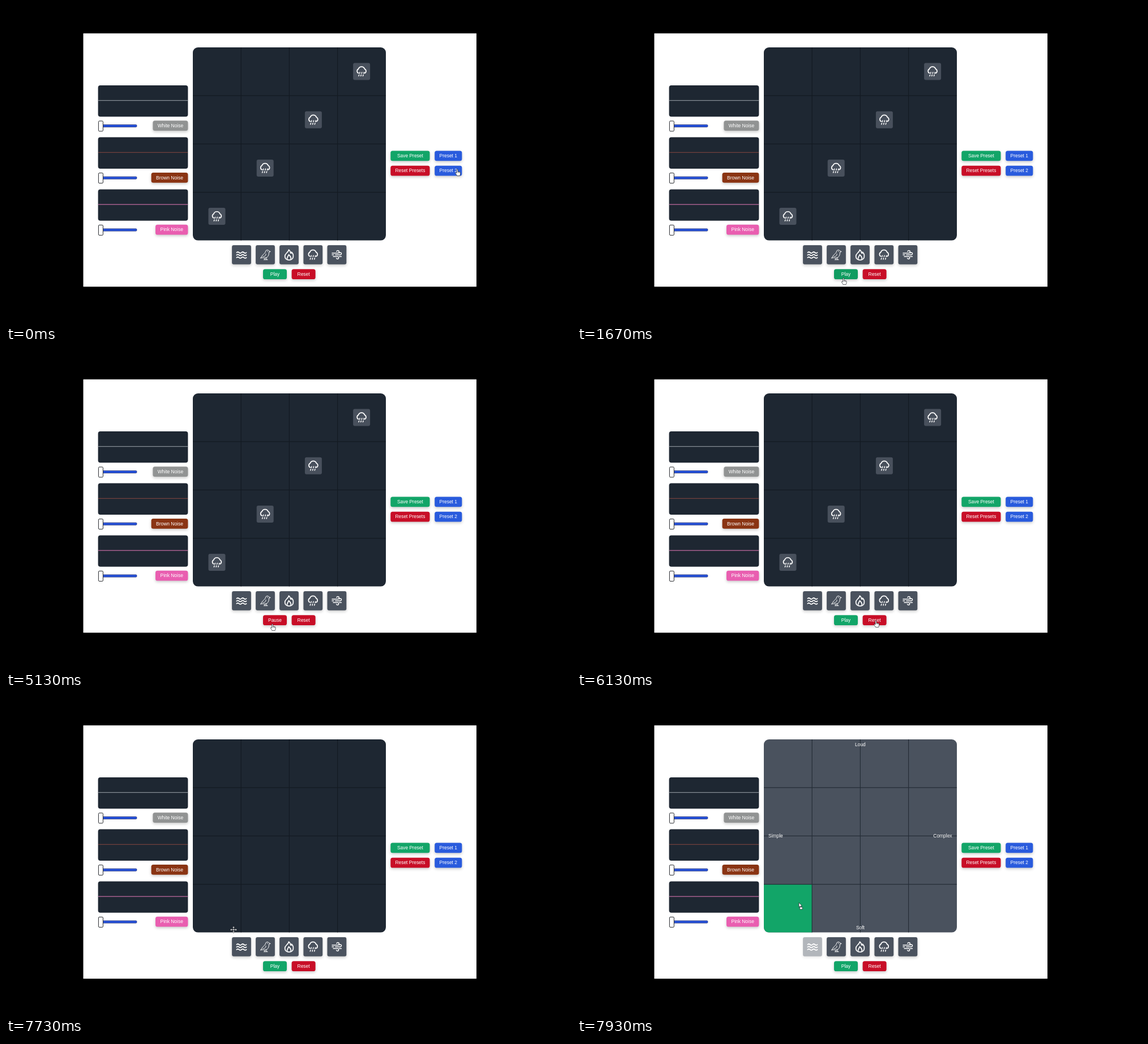
These frames come from a looping animation (998x561 px, 8 s). An HTML page:

```html
<!DOCTYPE html>
<html lang="en">
<head>
<meta charset="utf-8">
<title>Noise mixer</title>
<style>
html, body { margin: 0; width: 100%; height: 100%; overflow: hidden; background: #000; }
svg { display: block; width: 100%; height: 100%; }
text { font: 8.45px "Liberation Sans", Arial, sans-serif; fill: #fff; }
.mid { text-anchor: middle; }
.raised { filter: drop-shadow(0 2px 2.5px rgba(0, 0, 0, .22)); }
.icon { fill: none; stroke: #fff; stroke-width: 1.7; stroke-linecap: round; stroke-linejoin: round; }
.cursor { fill: #fff; stroke: #20242a; stroke-width: .7; stroke-linejoin: round; }
</style>
</head>
<body>
<svg id="stage" viewBox="0 0 998 561"></svg>
<script>
const LOOP = 8000;
const GREEN = [18, 165, 104], GREEN_HOVER = [16, 156, 97], RED = [200, 14, 39];
const PANEL = '#1e2732', SLATE = '#4a525e';
const GRID = { x: 330, y: 73, size: 341, cell: 85.2 };
const TILE_X = [416, 458, 500, 542.3, 584.4];
const rgb = c => `rgb(${c.map(Math.round)})`;

const ICONS = {
  waves: [-4.4, 0, 4.4].map(y =>
    `<path d="M-8.6 ${y + .6}q2.1 -2 4.3 0t4.3 0t4.3 0t4.3 0"/>`).join(''),
  bird: `<g stroke-width="1"><path d="M8.8 -5.6L6.6 -6.6A3.3 3.3 0 0 0 .4 -5.6C.2 -3 -2.6 -1.8 -4.6 .6L-8.4 6.2L-5.2 5C-2 6.6 2.6 5.8 4.8 2.6C6.4 .2 6.2 -2 6.5 -4.2Z"/>
    <path d="M1 -1.4C1.4 1.6 -1 3.4 -4 3.4M-.4 5.6L-.8 8.8M2 5.2L2.2 8.8M-2.6 8.8H.2M.8 8.8H4"/></g><circle cx="3.8" cy="-5.8" r=".4" stroke-width=".5"/>`,
  flame: `<path d="M-.6 -8.8C3 -6.6 2 -3.6 3.4 -2.4C4.4 -2.8 4.4 -4 4.2 -4.8C6.6 -2.6 7.8 .2 7.4 3A7.4 6.4 0 0 1 -7.4 3C-7.6 -.4 -5.6 -1.8 -3.6 -3.8C-1.8 -5.4 -.6 -6.6 -.6 -8.8Z"/>
    <path d="M-3.2 8C-4.6 4.6 -1.4 3 -.6 -.2C1.2 1.6 4.6 4.4 3 8"/>`,
  rain: `<path d="M-5.6 2.9A4 4 0 0 1 -5.6 -4.4A5.8 5.8 0 0 1 5.4 -4.4A4 4 0 0 1 5.6 2.9"/>` +
    [-3, .7, 4.4].map(x =>
      `<path stroke-width="1.5" d="M${x} 1.4l-.7 2.1M${x - 1.4} 6l-.7 2.1"/>`).join(''),
  wind: `<g stroke-width="1.5"><path d="M-8.4 -2.9H1.6A2.2 2.2 0 1 0 -.4 -5.8"/>
    <path d="M-8.4 .2H-5.6M-2.6 .2H6A2.1 2.1 0 1 0 4.2 -3"/>
    <path d="M-6.4 3.3H1.2A2.1 2.1 0 1 1 -.8 6.2M4.2 3.3H8"/></g>`
};

const CURSORS = {
  arrow: '<path d="M0 0V9L2.1 7.1L3.5 10.2L5 9.5L3.7 6.6H6.4Z"/>',
  hand: `<path d="M-1 .9A1 1 0 0 1 1 .9V4.1L4.6 4.8Q5.6 5.1 5.6 6.2V8Q5.2 10 4.5 11.6H-.4Q-1.2 9.6 -3 7.6Q-3.6 6.6 -2.7 6.1Q-1.9 5.9 -1 7Z"/>
    <path fill="none" stroke-width=".5" d="M1 4V6.4M2.6 4.6V6.5M4.1 4.9V6.7"/>`,
  move: `<path d="M0 -6L2.2 -3.4H.7V-.7H3.4V-2.2L6 0L3.4 2.2V.7H.7V3.4H2.2L0 6L-2.2 3.4H-.7V.7H-3.4V2.2L-6 0L-3.4 -2.2V-.7H-.7V-3.4H-2.2Z"/>`,
  drag: `<path d="M0 0V8L1.9 6.3L3 8.6L4.2 8L3.2 5.9H5.6Z"/>
    <rect x="1.4" y="8" width="4.8" height="3.8"/>`
};

const rect = (x, y, w, h, r, fill, extra = '') =>
  `<rect x="${x}" y="${y}" width="${w}" height="${h}" rx="${r}" fill="${fill}" ${extra}/>`;

const button = (x, y, w, label, fill, id = '') =>
  `<g ${id && `id="${id}"`}>${rect(x, y, w, 17.8, 3.6, fill, 'class="raised"')}
   <text class="mid" x="${x + w / 2}" y="${y + 11.6}">${label}</text></g>`;

const tile = (x, y, size, fill, icon, extra = '') =>
  `<g transform="translate(${x} ${y})" ${extra}>${rect(-size / 2, -size / 2, size, size, 3, fill)}
   <g class="icon">${ICONS[icon]}</g></g>`;

const noise = (y, label, x, fill, line) => `
  ${rect(162.6, y, 158.8, 55.4, 4, PANEL)}
  <path d="M163 ${y + 26.7}H321" stroke="${line}" stroke-width="1.2"/>
  ${rect(166.5, y + 69.6, 64.4, 4, 1.4, '#2856e2', 'stroke="#1a2a78" stroke-width=".9"')}
  ${rect(163.4, y + 63, 8, 18, 1.6, '#fff', 'stroke="#25282c" stroke-width="1"')}
  ${button(x, y + 62.4, 321.4 - x, label, fill)}`;

function gridLines() {
  let d = '';
  for (let i = 1; i < 4; i++) {
    const p = i * GRID.cell;
    d += `M${GRID.x + p} ${GRID.y}v${GRID.size}M${GRID.x} ${GRID.y + p}h${GRID.size}`;
  }
  return d;
}

const stage = document.getElementById('stage');
stage.innerHTML = `
  <clipPath id="round">${rect(GRID.x, GRID.y, GRID.size, 340.6, 9, '#fff')}</clipPath>
  ${rect(0, 0, 998, 561, 0, '#000')}
  ${rect(136.5, 48.3, 694.5, 446.9, 0, '#fff')}
  ${noise(139.9, 'White Noise', 259.4, '#919393', '#858d94')}
  ${noise(231.6, 'Brown Noise', 256.6, '#8a3413', '#71403c')}
  ${noise(323.4, 'Pink Noise', 264, '#e95eb0', '#c06a9f')}
  <g clip-path="url(#round)">
    ${rect(GRID.x, GRID.y, GRID.size, GRID.size, 0, PANEL, 'id="board"')}
    ${rect(GRID.x, GRID.y + 3 * GRID.cell, GRID.cell, GRID.cell, 0, rgb(GREEN), 'id="drop"')}
    <path id="lines" d="${gridLines()}" stroke-width="1.2"/>
  </g>
  <g id="rain">${[0, 1, 2, 3].map(i =>
    tile(372.5 + i * GRID.cell, 371.1 - i * GRID.cell, 30, '#48505c', 'rain')).join('')}</g>
  <g id="labels">
    <text class="mid" x="500.4" y="84.8">Loud</text>
    <text class="mid" x="500.4" y="407.6">Soft</text>
    <text x="338" y="246.2">Simple</text>
    <text x="662.6" y="246.2" text-anchor="end">Complex</text>
  </g>
  ${Object.keys(ICONS).map((name, i) =>
    tile(TILE_X[i], 438.8, 33.8, SLATE, name, `id="${name}" class="raised"`)).join('')}
  ${button(454, 464.2, 42, 'Play', rgb(GREEN), 'play')}
  ${button(504.6, 464.2, 42, 'Reset', rgb(RED))}
  ${button(679.3, 255.5, 69.2, 'Save Preset', rgb(GREEN))}
  ${button(679.3, 281.8, 69.2, 'Reset Presets', rgb(RED))}
  ${button(757.2, 255.5, 48.2, 'Preset 1', '#295bdd')}
  ${button(757.2, 281.8, 48.2, 'Preset 2', '#295bdd')}
  <g id="cursor" class="cursor">${Object.entries(CURSORS).map(([k, v]) =>
    `<g data-kind="${k}">${v}</g>`).join('')}</g>`;

const $ = id => document.getElementById(id);
const playBox = $('play').querySelector('rect'), playText = $('play').querySelector('text');
const pointers = [...$('cursor').children];

// time, x, y of the pointer's hot spot
const PATH = [
  [0, 797, 288], [410, 797, 288], [730, 589, 330], [940, 589, 330],
  [1200, 492, 401], [1440, 477, 462], [1670, 470.5, 480], [5560, 470.5, 480],
  [5930, 526, 478], [6130, 528, 474], [6810, 528, 474], [7270, 405, 438],
  [7630, 405, 438], [7730, 402, 409], [7930, 392, 361], [8000, 391, 359]
];
const still = (a, b) => a && b && a[1] === b[1] && a[2] === b[2];

function pointerAt(t) {
  const i = PATH.findIndex((p, n) => n && t <= p[0]);
  const a = PATH[i - 1], b = PATH[i];
  let u = (t - a[0]) / (b[0] - a[0]);
  const from = still(PATH[i - 2], a), to = still(b, PATH[i + 1]);
  if (from && to) u = u * u * (3 - 2 * u);
  else if (from) u = u ** 1.4;
  else if (to) u = 1 - (1 - u) ** 1.6;
  return [a[1] + (b[1] - a[1]) * u, a[2] + (b[2] - a[2]) * u];
}

const inside = (x, y, l, t, r, b) => x >= l && x <= r && y >= t && y <= b;
const BUTTONS = [[454, 464, 496, 482], [504.6, 464, 546.6, 482],
  [679, 255, 748.5, 273.5], [679, 281, 748.5, 299.6],
  [757, 255, 805.5, 273.5], [757, 281, 805.5, 299.6]];

function pointerKind(t, x, y) {
  if (t >= 7790) return 'drag';
  if (t >= 7270) return 'move';
  if (BUTTONS.some(b => inside(x, y, ...b))) return 'hand';
  return TILE_X.some(c => inside(x, y, c - 17, 422, c + 17, 456)) ? 'move' : 'arrow';
}

const ramp = (t, start, len) => Math.min(1, Math.max(0, (t - start) / len));
const show = (el, on) => el.setAttribute('visibility', on ? 'visible' : 'hidden');

function draw(t) {
  const [x, y] = pointerAt(t), kind = pointerKind(t, x, y);
  $('cursor').setAttribute('transform', `translate(${x} ${y})`);
  pointers.forEach(p => show(p, p.dataset.kind === kind));

  const over = inside(x, y, ...BUTTONS[0]);
  const base = over ? GREEN_HOVER : GREEN;
  const red = ramp(t, 3270, 360) - ramp(t, 5190, 360);
  playBox.setAttribute('fill', rgb(base.map((c, i) => c + (RED[i] - c) * red)));
  playText.textContent = t >= 3260 && t < 5190 ? 'Pause' : 'Play';

  const drag = t >= 7790;
  show($('rain'), t < 6530);
  show($('labels'), drag);
  show($('drop'), drag);
  $('board').setAttribute('fill', drag ? SLATE : PANEL);
  $('lines').setAttribute('stroke', drag ? '#252d37' : '#131a22');
  $('waves').setAttribute('opacity', drag ? .42 : 1);
}

function tick() {
  draw(performance.now() % LOOP);
  requestAnimationFrame(tick);
}
tick();
</script>
</body>
</html>
```
